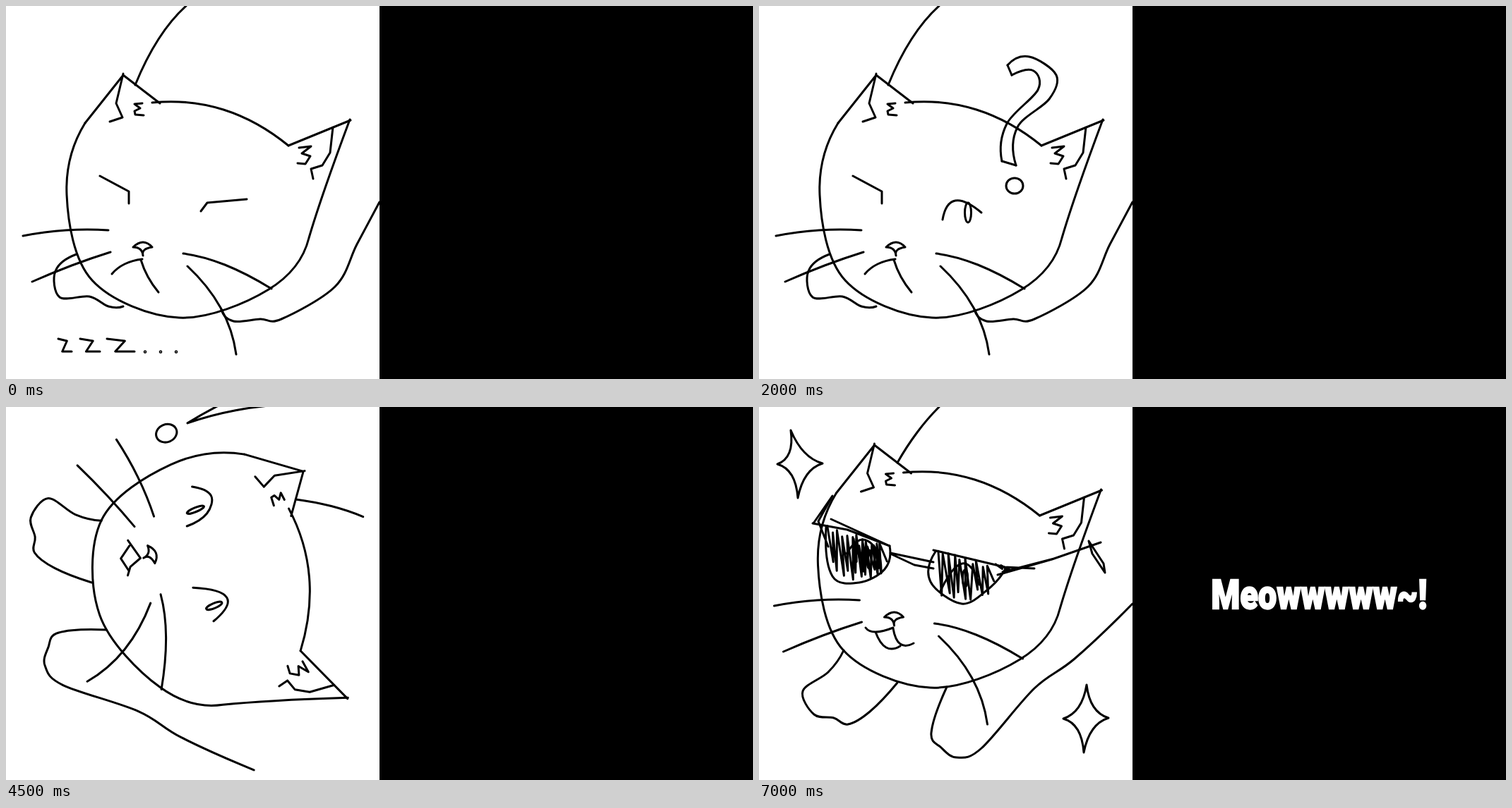
Write an HTML page that moves like this. It is 1058 px wide and 529 px high and loops after 8 s.

```html
<!DOCTYPE html>
<html lang="en">
<head>
<meta charset="utf-8">
<title>Meow</title>
<style>
html, body { margin: 0; width: 100%; height: 100%; overflow: hidden; background: #fff; }
svg { display: block; width: 100%; height: 100%; }
.ink { fill: none; stroke: #000; stroke-width: 3; stroke-linecap: round; stroke-linejoin: round; }
.caption { font: 900 57px Impact, Roboto, Inter, sans-serif; fill: #fff; stroke: #fff; stroke-width: 2.4; text-anchor: middle; letter-spacing: .4px; }
.dots { letter-spacing: -.11em; }
</style>
</head>
<body>
<svg viewBox="0 0 1058 529">
  <rect width="529" height="529" fill="#fff"/>
  <g id="cat" class="ink"></g>
  <rect x="529" width="529" height="529" fill="#000"/>
  <g transform="translate(793.5 286) scale(.815 1)"><text id="caption" class="caption"></text></g>
</svg>
<script>
const TURN_START = 400, STEP = 100, STEPS = 7, SCENE = 2000;

const points = text => text.match(/\S+ \S+/g).map(p => p.split(" ").map(Number));
const path = d => `<path d="${d}"/>`;
const line = (...strokes) => path(strokes.map(s => "M" + points(s).join("L")).join(""));
const oval = (x, y, rx, ry) => `<ellipse cx="${x}" cy="${y}" rx="${rx}" ry="${ry}"/>`;

// Smooth strokes through a few key points; the ends continue as parabolas.
function curve(...strokes) {
  return path(strokes.map(stroke => {
    const p = points(stroke), end = p.length - 1;
    const beyond = (a, b, c) => a.map((v, j) => 3 * v - 3 * b[j] + c[j]);
    const all = [beyond(p[0], p[1], p[2]), ...p, beyond(p[end], p[end - 1], p[end - 2])];
    let d = "M" + p[0];
    for (let i = 1; i <= end; i++) {
      const [before, a, b, after] = all.slice(i - 1, i + 3);
      const c1 = a.map((v, j) => v + (b[j] - before[j]) / 6);
      const c2 = b.map((v, j) => v - (after[j] - a[j]) / 6);
      d += `C${c1} ${c2} ${b}`;
    }
    return d;
  }).join(""));
}

function sparkle(x, y, lean) {
  const tips = [[lean, -47], [32, 0], [-3, 49], [-32, 1]];
  const at = ([dx, dy]) => [x + dx, y + dy];
  return path("M" + at(tips[0]) + tips.map((tip, i) => {
    const next = tips[(i + 1) % 4];
    return `Q${at(tip.map((v, j) => (v + next[j]) * .17))} ${at(next)}`;
  }).join(""));
}

// Scribble up and down between two edges.
function hatch(x0, x1, gap, top, bottom, seed) {
  const rand = () => (seed = seed * 16807 % 2147483647) / 2147483647;
  const marks = [];
  for (let x = x0, down = false; x <= x1; x += gap, down = !down) {
    const y = down ? bottom(x) - rand() * 18 : top(x) + rand() * 9;
    marks.push([x + rand() * 5 + (down ? 2 : -2), y]);
  }
  return path("M" + marks.join("L"));
}

const ears =
  line("112 166 166 98 218 138", "166 96 156 138 165 158 147 164") +
  line("193 138 182 139 190 145 182 149 183 154 195 155") +
  line("400 198 488 162", "463 172 459 208 448 226 432 231 435 245") +
  line("415 201 432 199 419 209 431 213 424 224 413 223");
const skull = curve(
  "207 137 308 147 400 198",
  "487 161 452 258 429 329",
  "429 329 372 402 245 442 122 389 86 268 112 166");
const nose = curve("180 342 194 335 207 342", "207 342 196 346 194 354", "194 354 190 345 180 342");
const whiskers = curve(
  "24 326 85 318 145 318", "37 391 93 368 148 349",
  "251 351 310 367 376 401", "257 369 304 428 326 494");
const head = ears + skull + nose + whiskers;

const lying = head +
  curve("255 0 216 47 183 112") +
  curve("100 352 70 376 76 413 118 412 145 426 166 426") +
  curve("305 430 322 447 360 444 390 444 466 398 497 338 529 278") +
  curve("150 380 168 366 193 359", "191 360 201 384 216 406") +
  line("133 241 174 263 174 280");

const zed = (x, w) => line(`${x} 472 ${x + w * .65} 475 ${x + w * .3} 490 ${x + w} 490`);
const snore = zed(74, 19) + zed(105, 28) + zed(143, 39) +
  [0, 1, 2].map(i => oval(197 + 22 * i, 490.5, .8, .8)).join("");
const asleep = line("276 291 285 279 341 274") + snore;

const question =
  curve("344 220 351 167 395 119 389 92 358 98") +
  curve("352 84 383 72 421 98 411 132 366 172 364 226") +
  line("364 226 344 220", "358 98 352 84") + oval(362, 255, 12, 11);
const peeking = curve("260 303 278 276 315 293") + oval(296, 293, 4.5, 14) + question;

const sitting = `<g transform="translate(-2.5 -44)">${head}</g>` +
  curve("255 0 224 36 196 79") +
  curve("120 345 98 376 62 403 78 436 106 441 126 450 157 432 196 391") +
  curve("266 397 244 462 258 483 280 497 315 484 390 399 447 357 529 279") +
  curve("124 208 146 188 167 203 173 236", "257 261 288 222 312 252") +
  oval(156, 216, 3, 13) + oval(292, 243, 3.5, 12);

const alert = line("160 321 190 314 196 332 206 340", "168 322 180 340 201 336") +
  line("28 36 67 38") + curve("67 38 47 110 38 180", "29 36 30 110 38 180") + oval(40, 213, 12.5, 15);

const rim = (cx, cy, rx, ry) => x => cy + ry * Math.sqrt(Math.max(0, 1 - ((x - cx) / rx) ** 2));
const leftTop = x => 168 + (x - 95) * .3, leftRim = rim(139, 204, 48, 46);
const rightTop = x => 204 + (x - 250) * .22, rightRim = rim(286, 228, 52, 50);
const tint =
  hatch(97, 178, 3.4, leftTop, leftRim, 71) +
  hatch(132, 166, 2.8, x => leftTop(x) + 8, x => leftRim(x) - 14, 29) +
  hatch(251, 330, 4.1, rightTop, rightRim, 53) +
  hatch(336, 352, 2.5, rightTop, x => 246 - (x - 336) * .5, 17);
const shades =
  curve("95 170 104 240 142 249 178 230 185 197", "250 205 243 248 287 279 325 258 350 228") +
  line("76 165 125 174 185 197", "102 159 185 197", "77 165 104 126 84 162 98 198") +
  line("186 207 247 220", "188 209 220 224 247 229") +
  line("247 203 348 227 390 229", "338 238 415 216 484 192", "345 234 418 215") +
  line("467 190 472 208 490 235 488 222 467 190") + tint;
const grin = curve("151 313 165 319 190 313", "190 314 200 336 219 335", "165 319 180 341 200 339");
const cool = grin + shades + sparkle(58, 80, -13) + sparkle(463, 441, 1);

const scenes = [
  { art: lying + asleep, text: 'Meow<tspan class="dots">...</tspan>' },
  { art: lying + peeking, text: "Meow?" },
  { art: sitting + alert, text: "Meow!" },
  { art: sitting + cool, text: "Meowwwww~!" }
];

const cat = document.getElementById("cat");
const caption = document.getElementById("caption");
let shown = -1;

function draw(time) {
  const t = time % (SCENE * scenes.length);
  const index = Math.floor(t / SCENE), local = t % SCENE;
  const step = Math.min(STEPS, Math.max(0, Math.floor((local - TURN_START) / STEP) + 1));
  const angle = 180 * (1 - Math.cos(Math.PI * step / STEPS));
  if (index !== shown) {
    cat.innerHTML = scenes[index].art;
    caption.innerHTML = scenes[index].text;
    shown = index;
  }
  cat.setAttribute("transform", `rotate(${angle % 360} 264.5 264.5)`);
  caption.setAttribute("visibility", step === STEPS ? "visible" : "hidden");
}

function tick() {
  draw(performance.now());
  requestAnimationFrame(tick);
}
tick();
</script>
</body>
</html>
```
